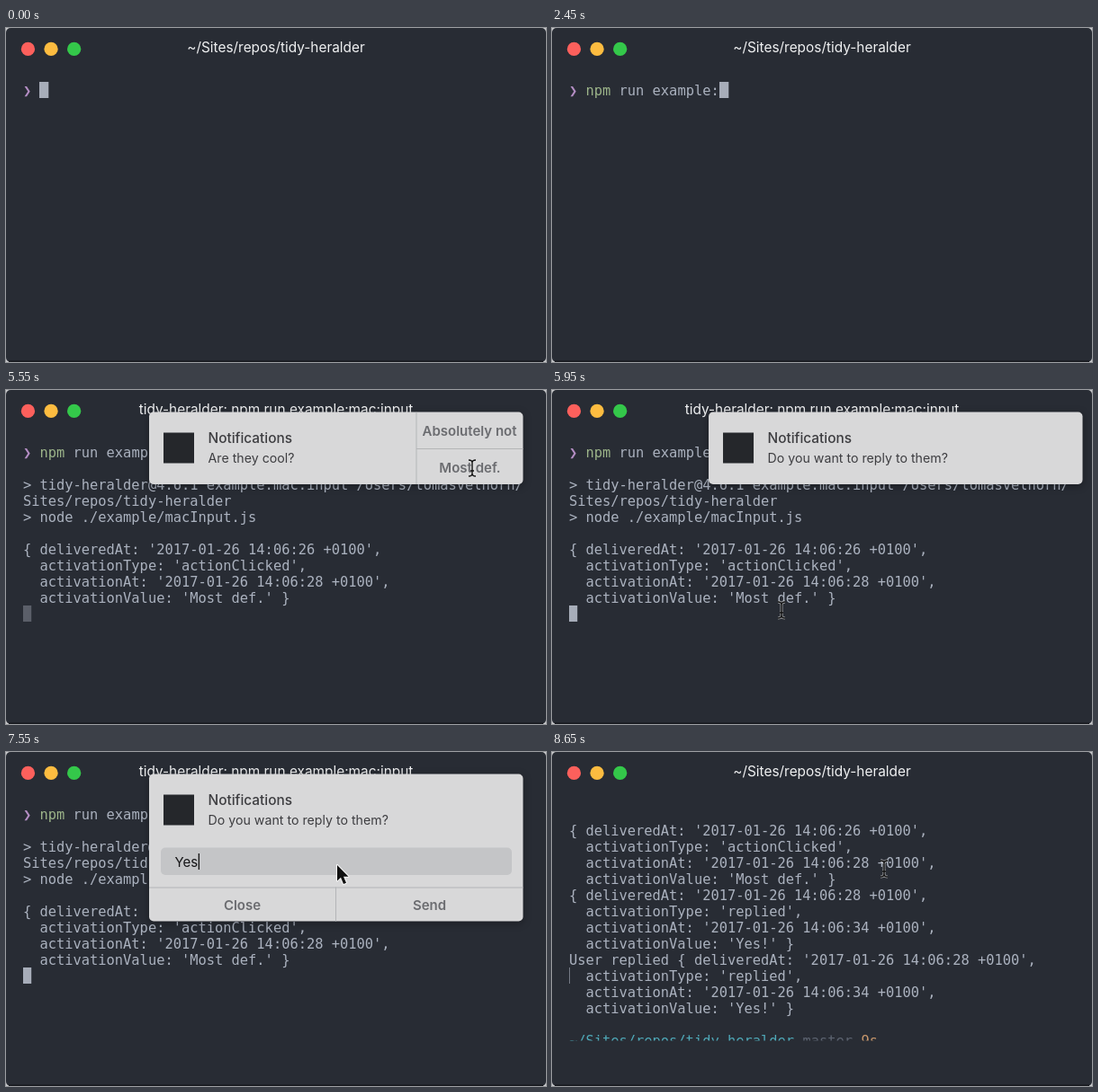
Animation of 600x372 px, one loop 8.7 s. Source, as an HTML page with a canvas:

```html
<!DOCTYPE html>
<html lang="en">
<head>
<meta charset="utf-8">
<title>Terminal notifications</title>
<style>
  html, body { margin: 0; width: 100%; height: 100%; overflow: hidden; background: #c9cacc; }
  canvas { display: block; }
</style>
</head>
<body>
<canvas id="stage" width="600" height="372"></canvas>
<script>
const ctx = document.getElementById('stage').getContext('2d');
const LOOP = 8700, CELL = 9.271, ROW = 18, LEFT = 18.9, BASELINE = 74.6;
const MONO = '15.4px "DejaVu Sans Mono", monospace';
const GRAY = '#abb2bf', GREEN = '#9db58a', RED = '#d0707a', PURPLE = '#b48ec4';

const PROJECT = 'tidy-heralder';
const PATH = '~/Sites/repos/' + PROJECT;
const COMMAND = 'npm run example:mac:input ';
// [time, characters typed]
const TYPING = [[0, 0], [200, 1], [300, 2], [400, 3], [500, 4], [650, 5], [700, 6], [800, 7], [850, 8],
  [1600, 9], [1700, 10], [2100, 15], [2450, 16], [2550, 17], [2650, 18], [3000, 19], [3200, 20],
  [3350, 21], [3700, 26]];
const REPLY = [[0, 0], [7200, 1], [7350, 2], [7550, 3], [7700, 4]];
// [time, x, y]
const POINTER = [[4900, 430, 240], [5200, 518, 87], [5570, 518, 87], [5920, 255, 245], [6020, 255, 245],
  [6400, 514, 87], [6720, 514, 87], [7050, 368, 126], [8200, 368, 126], [8300, 369, 130]];

const result = (type, from, to, value, lead = '') => [
  `${lead}{ deliveredAt: '2017-01-26 14:06:${from} +0100',`,
  `  activationType: '${type}',`,
  `  activationAt: '2017-01-26 14:06:${to} +0100',`,
  `  activationValue: '${value}' }`
];
// [time shown, first row, lines]
const OUTPUT = [
  [4200, 2, [`> ${PROJECT}@4.6.1 example:mac:input /Users/tomasvelhorn/`,
    'Sites/repos/' + PROJECT, '> node ./example/macInput.js']],
  [5500, 6, result('actionClicked', 26, 28, 'Most def.')],
  [8400, 10, result('replied', 28, 34, 'Yes!')],
  [8400, 14, result('replied', 28, 34, 'Yes!', 'User replied ')]
];

const clamp = v => Math.max(0, Math.min(1, v));
const progress = (t, start, length) => clamp((t - start) / length);
const ease = u => (1 - Math.cos(Math.PI * u)) / 2;
const latest = (steps, t) => steps.filter(s => s[0] <= t).pop()[1];
const inter = (size, weight = 400) => `${weight} ${size}px Inter, sans-serif`;

function text(str, x, y, color, font, align = 'left') {
  ctx.font = font;
  ctx.fillStyle = color;
  ctx.textAlign = align;
  ctx.fillText(str, x, y);
}

function rect(x, y, w, h, color, radius = 0) {
  ctx.fillStyle = color;
  ctx.beginPath();
  ctx.roundRect(x, y, w, h, radius);
  ctx.fill();
}

const mono = (str, col, row, color = GRAY) =>
  text(str, LEFT + col * CELL, BASELINE + row * ROW, color, MONO);

function drawWindow(t) {
  rect(0, 0, 600, 372, '#282c34', 5);
  rect(3, 370.5, 594, 1.5, '#17191e');
  ['#fc605c', '#fdbc40', '#34c84a'].forEach((color, i) =>
    rect(16.8 + i * 25.6, 15.8, 15.3, 15.3, color, 7.65));
  const running = t >= 3900 && t < 8650;
  text(running ? `${PROJECT}: npm run example:mac:input` : PATH, 300, 27, '#f0f1f2', inter(15.4), 'center');
}

function drawTerminal(t) {
  const done = t >= 8650;
  const scroll = done ? 5 : t >= 8400 ? 3 : 0;
  const typed = latest(TYPING, t);
  ctx.save();
  ctx.beginPath();
  ctx.rect(0, 60, 600, done ? 261.5 : 300);
  ctx.clip();
  ctx.translate(0, -scroll * ROW);

  mono('❯', 0, 0, PURPLE);
  mono(COMMAND.slice(0, Math.min(3, typed)), 2, 0, typed < 3 ? RED : GREEN);
  mono(COMMAND.slice(3, Math.max(3, typed)), 5, 0);
  for (const [start, row, lines] of OUTPUT)
    if (t >= start && row + lines.length > scroll)
      lines.forEach((line, i) => { if (row + i >= scroll) mono(line, 0, row + i); });

  if (done) {
    mono(PATH, 0, 19, '#4fa9b8');
    mono('master', PATH.length + 1, 19, '#5c6370');
    mono('9s', PATH.length + 8, 19, '#c8976c');
    rect(19, 60 + 15 * ROW, 1, ROW, '#747a85');
  } else {
    const row = latest([[0, 0], [3900, 1], [4200, 6], [5500, 10], [8400, 18]], t);
    const col = row ? 0 : 2 + typed;
    ctx.globalAlpha = t >= 5500 && t < 5650 ? 0.4 : 1;
    rect(Math.round(LEFT + col * CELL), 60 + row * ROW, row ? 9.2 : 10.3, ROW, '#a7adb9');
  }
  ctx.restore();
}

function drawBanner(t, { enter, leave, body, hover, buttons, expand }) {
  if (t < enter || t >= leave + 150) return;
  const x = 600 - 441 * ease(progress(t, enter, 220));
  const open = ease(progress(t, expand, 200));
  const height = 80.5 + 83.5 * open;
  const alpha = 1 - progress(t, leave, 150);
  ctx.save();
  ctx.globalAlpha = alpha;
  ctx.translate(x, 24.5);
  ctx.shadowColor = 'rgba(0,0,0,.35)';
  ctx.shadowBlur = 8;
  ctx.shadowOffsetY = 2;
  rect(0, 0, 415.5, height, '#d8d8d9', 5);
  ctx.shadowColor = 'transparent';
  ctx.beginPath();
  ctx.roundRect(0, 0, 415.5, height, 5);
  ctx.clip();

  rect(16, 23, 34, 34, '#25272b');
  text('Notifications', 65.5, 34.5, '#3d3d40', inter(15.4, 500));
  text(body, 65.5, 56.5, '#3d3d40', inter(14.2));

  const line = '#b4b5b7', label = '#6b6c70';
  const button = (str, cx, y) => text(str, cx, y, label, inter(15, 600), 'center');
  ctx.globalAlpha = alpha * progress(t, hover, 100) * (1 - open);
  rect(296.5, 0, 1, 81, line);
  rect(297, 40.5, 119, 1, line);
  button(buttons[0], 356, 26);
  button(buttons[1], 356.5, 67);

  ctx.globalAlpha = alpha * open;
  if (open > 0) {
    rect(13, 82, 390, 30.5, '#c4c5c7', 5);
    rect(0, 126, 416, 1, line);
    rect(207, 126, 1, 40, line);
    button('Close', 103.5, 151);
    button('Send', 311.5, 151);
    const reply = 'Yes!'.slice(0, latest(REPLY, t));
    text(reply, 28.5, 103.5, '#151517', inter(15));
    if (t < 8000) rect(29 + ctx.measureText(reply).width, 88.5, 1.3, 18, '#111');
  }
  ctx.restore();
}

function pointerAt(t) {
  const i = POINTER.findIndex(p => p[0] > t);
  if (i < 0) return POINTER[POINTER.length - 1].slice(1);
  const [t0, x0, y0] = POINTER[i - 1], [t1, x1, y1] = POINTER[i];
  const u = ease(progress(t, t0, t1 - t0));
  return [x0 + (x1 - x0) * u, y0 + (y1 - y0) * u];
}

function drawPointer(t) {
  if (t < POINTER[0][0]) return;
  const arrow = t >= 6800 && t < 8300;
  const shape = new Path2D(arrow
    ? 'M0 0V17.5L4 13.8 7 21 10 19.7 7 12.8H12.5Z'
    : 'M-4-9Q0-9 0-6Q0-9 4-9M0-6V6M-4 9Q0 9 0 6Q0 9 4 9M-2 3H2');
  ctx.save();
  ctx.translate(...pointerAt(t));
  ctx.lineJoin = 'round';
  ctx.strokeStyle = arrow ? '#f4f4f4' : 'rgba(225,225,225,.6)';
  ctx.lineWidth = arrow ? 2.2 : 3;
  ctx.stroke(shape);
  if (arrow) {
    ctx.fillStyle = '#111';
    ctx.fill(shape);
  } else {
    ctx.strokeStyle = '#111';
    ctx.lineWidth = 1.4;
    ctx.stroke(shape);
  }
  ctx.restore();
}

const BANNERS = [
  { enter: 4461, leave: 5600, body: 'Are they cool?', hover: 5100,
    buttons: ['Absolutely not', 'Most def.'], expand: Infinity },
  { enter: 5757, leave: 8250, body: 'Do you want to reply to them?', hover: 6300,
    buttons: ['Close', 'Reply'], expand: 6700 }
];

function draw() {
  const t = performance.now() % LOOP;
  ctx.clearRect(0, 0, 600, 372);
  drawWindow(t);
  drawTerminal(t);
  BANNERS.forEach(banner => drawBanner(t, banner));
  drawPointer(t);
  requestAnimationFrame(draw);
}
draw();
</script>
</body>
</html>
```
